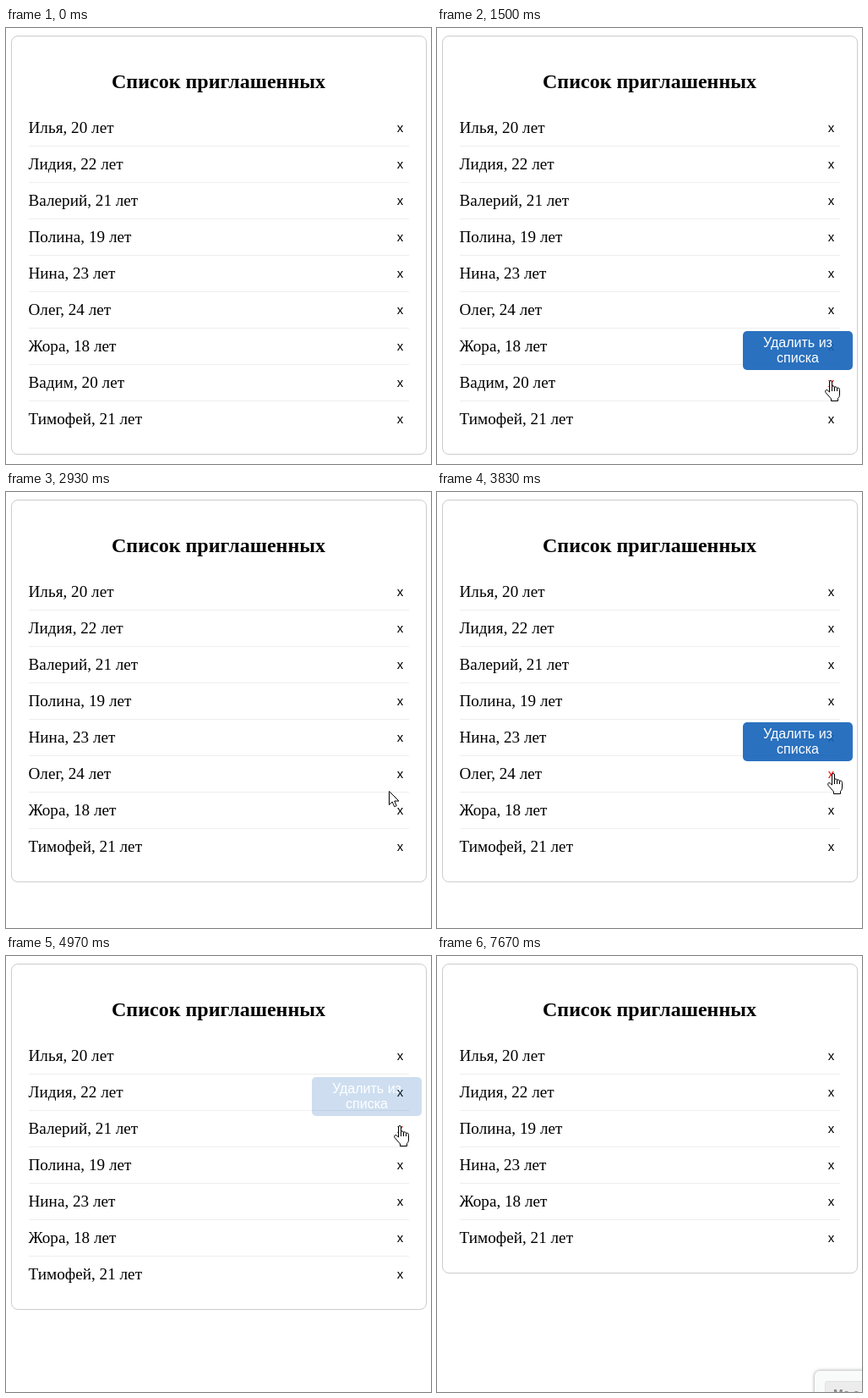
Recreate the animation shown at these times as an HTML page. Size 503x515 px, loop 8530 ms.

```html
<!DOCTYPE html>
<html lang="ru">
<head>
<meta charset="utf-8">
<title>Список приглашенных</title>
<style>
  html, body { margin: 0; width: 100%; height: 100%; overflow: hidden; background: #fff; }
  body { position: relative; }
  .card {
    position: absolute; left: 5.5px; top: 9px; width: 492px; box-sizing: border-box;
    padding: 20px; border: 1px solid #ccc; border-radius: 8px;
    font-family: "Liberation Serif", "Times New Roman", serif; color: #000;
  }
  h2 { margin: 20px 0; font-size: 24px; line-height: 27px; text-align: center; }
  .row {
    display: flex; justify-content: space-between; align-items: center;
    height: 42px; font-size: 19.2px; line-height: 22px;
  }
  .row + .row { border-top: 1px solid #eee; }
  .row b, .tip { font: 16px/18px "Liberation Sans", Arial, sans-serif; }
  .row b { width: 20px; padding: 6px 0; font-size: 15px; text-align: center; }
  .tip {
    position: absolute; left: 362px; width: 130px; height: 46px; padding: 5px;
    box-sizing: border-box; border-radius: 5px; background: #1362b9; color: #fff; text-align: center;
  }
  .panel {
    position: absolute; left: 447px; width: 120px; height: 80px; border-radius: 6px;
    background: #f9fafa; box-shadow: 0 0 4px #0006;
  }
  .panel span {
    position: absolute; left: 12px; top: 12px; width: 90px; height: 40px; padding: 6px 9px;
    border: 1px solid #e2e2e2; border-radius: 3px; background: #ececec; color: #888;
    font: bold 14px "Liberation Sans", Arial, sans-serif; box-sizing: border-box;
  }
  svg { position: absolute; left: 0; top: 0; width: 100%; height: 100%; }
  path { fill: #fff; stroke: #000; stroke-linejoin: round; }
</style>
</head>
<body>
<div class="card"><h2>Список приглашенных</h2></div>
<div class="tip">Удалить из списка</div>
<div class="panel"><span>Ma e</span></div>
<svg>
  <g id="cursor">
    <path id="arrow" d="M.5 .5V16.5L4.2 13L6.7 18.7L9.2 17.6L6.8 12H12Z"/>
    <path id="hand" transform="translate(-7)" d="M5.5 2Q5.5 .5 7 .5T8.5 2V7.5Q10 5.8 11.5 8Q13.5 6.8 14.5 9.3Q17.5 8.3 17.5 11.5V17Q17.5 20 15.5 21.5V24.5H7.5V22L1 14.5Q0 12.5 1.5 11.5Q3 11 5.5 14ZM8.5 7.5V13M11.5 8V13M14.5 9.3V13"/>
  </g>
</svg>
<script>
const LOOP = 8530, FADE = 300;
const $ = selector => document.querySelector(selector);
const card = $('.card'), tip = $('.tip'), panel = $('.panel');
const cursor = $('#cursor'), arrow = $('#arrow'), hand = $('#hand');

// name, age, time of removal
const guests = [
  ['Илья', 20], ['Лидия', 22], ['Валерий', 21, 6500], ['Полина', 19], ['Нина', 23],
  ['Олег', 24, 4230], ['Жора', 18], ['Вадим', 20, 2500], ['Тимофей', 21]
].map(([name, age, removed = Infinity]) => {
  const el = document.createElement('div');
  el.className = 'row';
  el.innerHTML = `<span>${name}, ${age} лет</span><b>x</b>`;
  card.append(el);
  return { el, button: el.lastChild, removed };
});

// visible row, start, end; a brief hover fades out again
const hovers = [
  [7, 1200, 2500], [7, 2500, 2760, true],
  [5, 3130, 4230], [5, 4230, 4450, true],
  [2, 4920, 6500], [2, 6490, 6730, true]
];

// start, end, then the points of a quadratic curve
const moves = [
  [530, 1370, [326, 515], [440, 440], [466, 416]],
  [2500, 3330, [466, 416], [439, 337], [468, 332]],
  [3830, 3830, [468, 332], [468, 332], [469, 332]],
  [4230, 5000, [469, 332], [430, 220], [466, 200]]
];

const clamp = v => Math.min(1, Math.max(0, v));
const bezier = (u, a, b, c, d) =>
  (1 - u) ** 3 * a + 3 * (1 - u) ** 2 * u * b + 3 * (1 - u) * u * u * c + u ** 3 * d;

// CSS "ease"
function ease(p) {
  let low = 0, high = 1;
  for (let i = 0; i < 16; i++) {
    const mid = (low + high) / 2;
    if (bezier(mid, 0, .25, .25, 1) < p) low = mid; else high = mid;
  }
  return bezier(low, 0, .1, 1, 1);
}

function cursorAt(t) {
  const [start, end, a, b, c] = moves.findLast(m => t >= m[0]) || moves[0];
  const p = end > start ? clamp((t - start) / (end - start)) : 1;
  const u = p * p * (3 - 2 * p);
  return [0, 1].map(i => (1 - u) ** 2 * a[i] + 2 * u * (1 - u) * b[i] + u * u * c[i]);
}

function draw(t) {
  const [slot, start, end, brief] = hovers.find(h => t >= h[1] && t < h[2]) || [-1, 0, 0];
  const over = slot >= 0 && (!brief || t < (start + end) / 2);

  for (const { el, removed } of guests) el.style.display = t < removed ? '' : 'none';
  guests.filter(guest => t < guest.removed).forEach(({ button }, i) => {
    button.style.color = over && i === slot ? 'red' : '';
  });

  const age = brief ? Math.min(t - start, end - t) : t - start;
  tip.style.opacity = slot < 0 ? 0 : .9 * ease(clamp(age / FADE));
  tip.style.top = 57 + 43 * slot + 'px';

  cursor.style.display = t >= 530 && t < 6615 ? '' : 'none';
  cursor.setAttribute('transform', `translate(${cursorAt(t).map(Math.round)})`);
  hand.style.display = over ? '' : 'none';
  arrow.style.display = over ? 'none' : '';

  panel.style.display = t >= 7600 ? '' : 'none';
  panel.style.top = 490 + 16 * clamp((7670 - t) / 70) + 'px';
}

const origin = performance.now();
function tick() {
  draw((performance.now() - origin) % LOOP);
  requestAnimationFrame(tick);
}
tick();
</script>
</body>
</html>
```
